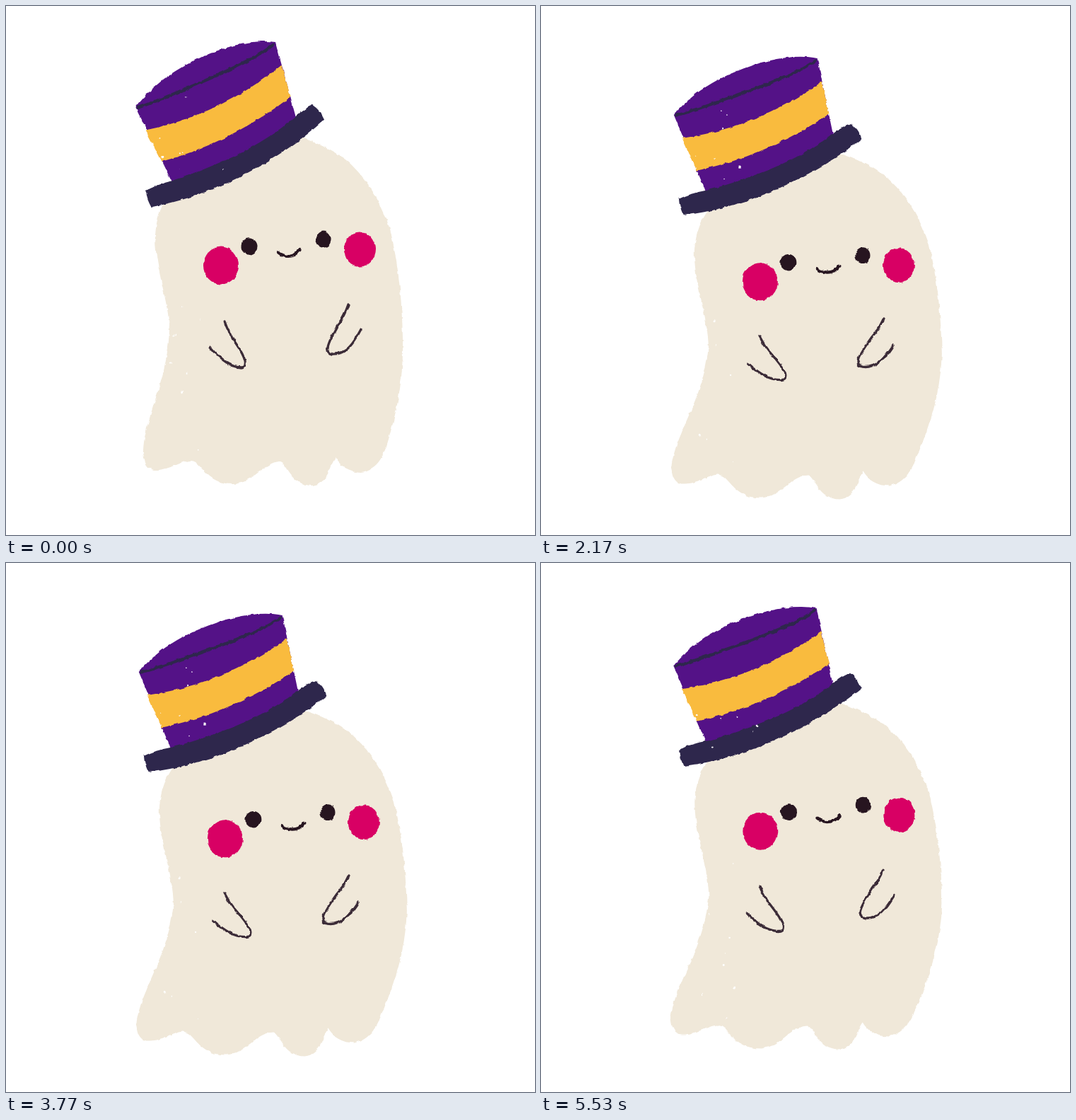
Animation, 748 px wide and 748 px high, one loop 5.61 s. Source, as an HTML page:

```html
<!DOCTYPE html>
<html lang="en">
<head>
<meta charset="utf-8">
<title>Ghost in a top hat</title>
<style>
  html, body { margin: 0; width: 100%; height: 100%; overflow: hidden; background: #fff; }
  svg { display: block; width: 100vw; height: 100vh; }
  .line { fill: none; stroke: #271520; stroke-width: 4.2; stroke-linecap: round; stroke-linejoin: round; }
  .arm { stroke: #3b2b37; stroke-width: 3.3; }
</style>
</head>
<body>
<svg viewBox="0 0 748 748">
  <defs>
    <filter id="rough" filterUnits="userSpaceOnUse" x="0" y="0" width="748" height="748" color-interpolation-filters="sRGB">
      <feTurbulence id="grain" type="fractalNoise" baseFrequency="0.11" numOctaves="2" seed="1" result="noise"/>
      <feDisplacementMap in="SourceGraphic" in2="noise" scale="4.5" xChannelSelector="R" yChannelSelector="G"/>
      <feGaussianBlur stdDeviation="0.6"/>
    </filter>
  </defs>
  <g filter="url(#rough)">
    <path id="body" fill="#f0e8d9"/>
    <g id="bodySpecks" fill="#fff"></g>
    <path id="armL" class="line arm" d="M309 446Q315 463 325 477C340 499 342 511 333 511C318 511 302 499 288 482"/>
    <path id="armR" class="line arm" d="M484 422Q479 437 470 450C453 480 450 491 462 492C481 493 491 478 502 457"/>
    <g id="face">
      <g fill="#d80064">
        <ellipse cx="304" cy="367" rx="25" ry="26.5"/>
        <ellipse cx="500" cy="344" rx="22" ry="24.5"/>
      </g>
      <g fill="#271520">
        <ellipse cx="344" cy="340" rx="11.5" ry="11.8"/>
        <ellipse cx="449" cy="330" rx="10.6" ry="11.4"/>
      </g>
      <path class="line" d="M384 348.5Q391 354 399 354Q409 354 415.500 345"/>
    </g>
    <g id="hat">
      <path fill="#541287" d="M-94-123C-70-134-42-145 8-145C55-145 98-135 124-117L102-8Q60 10 0 10Q-60 8-95-4Z"/>
      <path fill="#f9bb3e" d="M-96-88Q8-60 117-84L108.500-38Q0-18-95-38Z"/>
      <path class="line" style="stroke: #2e274c" d="M-91-121Q-60-117-22-115Q43-110 87-111Q105-112 120-115"/>
      <path fill="#2e274c" d="M-134-11Q-138 0-137 13Q-75 31-6 31Q75 30 137 12Q138-2 131-14Q118-15 102-10Q55 2 0 1Q-60-1-94-7Q-116-12-134-11Z"/>
      <g id="hatSpecks" fill="#fff"></g>
    </g>
  </g>
</svg>
<script>
const LOOP = 5610, POSES = 10, STEP = Math.PI / 6;

const outline = `M245 250C218 275 211 305 211 330C212 375 231 420 231 460
  C228 515 212 550 203 583C196 605 194 620 194 632C196 652 204 657 215 656
  C232 655 245 645 260 643C278 643 280 676 322 676C352 674 362 645 388 644
  C398 646 402 678 433 678C456 676 457 650 466 639C472 650 485 659 503 659
  C527 654 535 636 543 605C556 560 562 520 561 470C560 420 556 370 543 315
  C528 270 505 238 480 217C460 203 440 193 417 186L330 192Z`;

const el = id => document.getElementById(id);
const place = (id, transform) => el(id).setAttribute('transform', transform);

function random(seed) {
  let s = seed * 7919 + 17;
  return () => (s = s * 16807 % 2147483647) / 2147483647;
}

function specks(rnd, count, x, y, w, h) {
  let out = '';
  for (let i = 0; i < count; i++) {
    const r = .7 + 1.4 * rnd() ** 2;
    out += `<circle cx="${x + w * rnd()}" cy="${y + h * rnd()}" r="${r}"/>`;
  }
  return out;
}

// Moves the outline as a whole; the hem trails behind the sway
function bend(path, dx, dy) {
  return path.replace(/(\d+) (\d+)/g, (_, x, y) => {
    const hem = Math.max(0, Math.min(1, (y - 490) / 150));
    return `${+x + dx * (1 - 2.8 * hem)} ${+y + dy * (1 - .14 * hem)}`;
  });
}

function draw(p) {
  const bob = .56 * (1 - Math.cos(STEP * p));
  const sway = .55 * (1 - Math.cos(.7 * STEP * p));
  // The hat rocks like a damped spring
  const rock = Math.exp(-p / 3) * (4.1 * Math.cos(STEP * p) - 19.2 * Math.sin(STEP * p));
  const dx = 5.8 * sway, dy = 21.7 * bob, rnd = random(p + 3);

  el('body').setAttribute('d', bend(outline, dx, dy));
  place('face', `translate(${dx} ${dy})`);
  place('armL', `translate(0 ${20 * bob}) rotate(${-7 * bob} 309 446)`);
  place('armR', `translate(0 ${20 * bob}) rotate(${6 * bob} 484 422)`);
  place('hat', `translate(322.5 ${209 + 20 * bob + .53 * rock}) rotate(${-22.5 - rock})`);
  el('hatSpecks').innerHTML = specks(rnd, 7, -92, -105, 75, 115);
  el('bodySpecks').innerHTML = specks(rnd, 9, 222, 420, 55, 225);
  el('grain').setAttribute('seed', p + 1);
}

let shown = -1;
function tick() {
  // Drawings run at 12.5 per second on a 30 per second clock
  const t = performance.now() % LOOP;
  const beat = Math.floor((t + 3.4) * .03);
  const pose = Math.floor(beat * 5 / 12) % POSES;
  if (pose !== shown) draw(shown = pose);
  requestAnimationFrame(tick);
}
tick();
</script>
</body>
</html>
```
